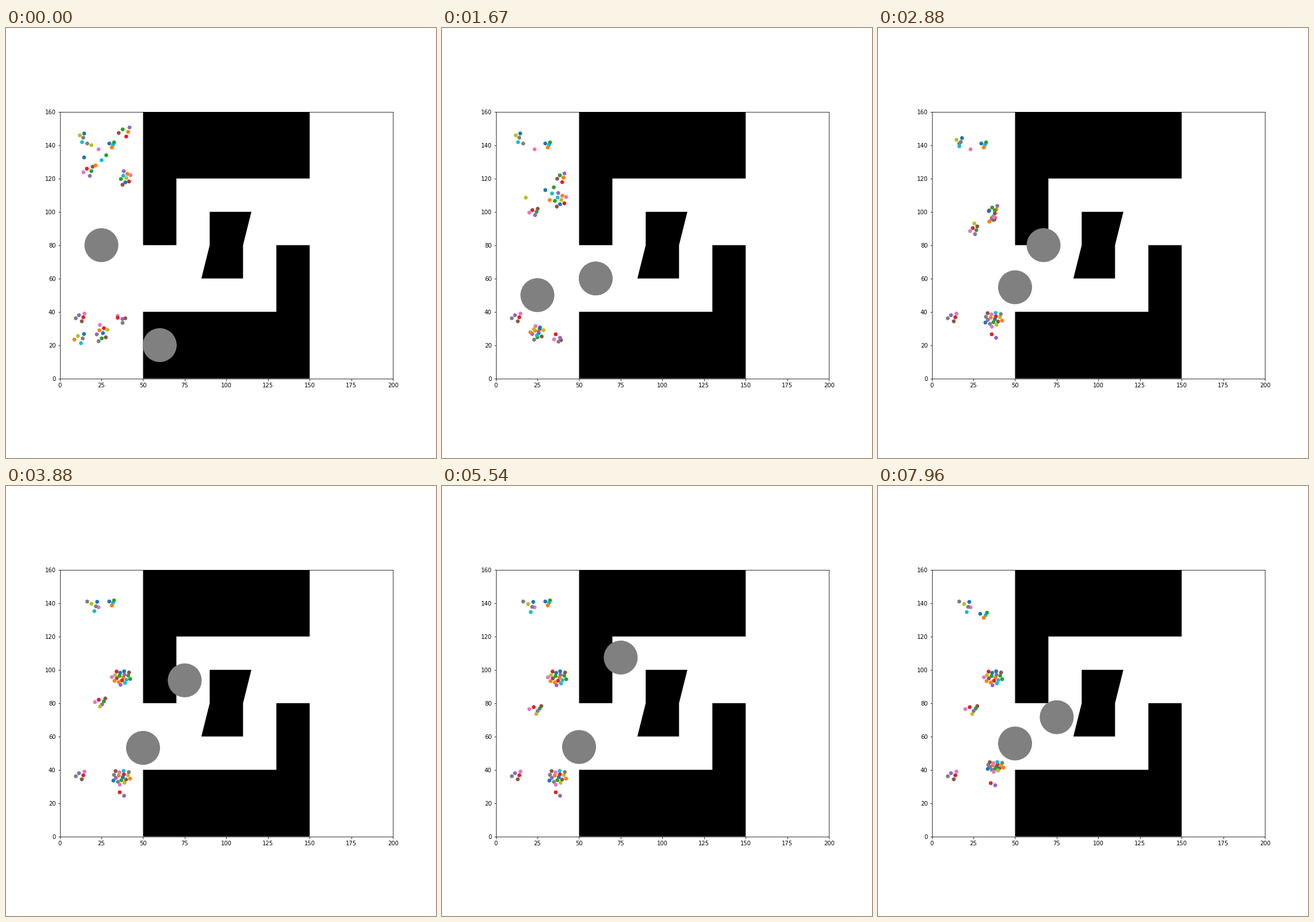
A matplotlib script for the animation above (8000 ms loop, 748 px wide and 748 px high).

```python
import numpy as np
import matplotlib.pyplot as plt
from matplotlib.animation import FuncAnimation
from matplotlib.patches import Circle, Polygon

SIZE, DPI = 748, 72
FRAMES, LOOP = 192, 8000
LEG = 20  # frames per leg of the plan
END = 9.55  # legs reached in the last frame
GOLDEN = np.pi * (3 - 5 ** 0.5)

fig, ax = plt.subplots(figsize=(SIZE / DPI, SIZE / DPI), dpi=DPI)
ax.set_aspect("equal")
ax.set_xlim(0, 200)
ax.set_ylim(0, 160)

WALLS = [
    [(50, 160), (150, 160), (150, 120), (70, 120), (70, 80), (50, 80)],
    [(90, 100), (115, 100), (110, 80), (110, 60), (85, 60), (90, 80)],
    [(50, 0), (50, 40), (130, 40), (130, 80), (150, 80), (150, 0)],
]
for wall in WALLS:
    ax.add_patch(Polygon(wall, facecolor="black", lw=0, snap=False))

# Large discs: one stop per leg
ROUTES = [
    [(25, 80), (25, 65), (25, 50)] + [(50, 50), (50, 60)] * 4,
    [(60, 20), (60, 40), (60, 60), (60, 80)]
    + [(75, y) for y in (80, 100, 120, 100, 80, 60, 80)],
]
discs = [ax.add_patch(Circle(r[0], 10, color="gray", zorder=3))
         for r in ROUTES]


def cloud(n, x, y, rx=0, ry=0):
    """Spread n points evenly over an ellipse."""
    k = np.arange(n)
    r, a = np.sqrt((k + 0.5) / n), k * GOLDEN
    return np.c_[x + rx * r * np.cos(a), y + ry * r * np.sin(a)]


class Swarm:
    """Dots that drift between arrangements, each a set of clouds."""

    def __init__(self, starts, stages):
        """starts: first colour of each opening cloud; stages: leg -> clouds."""
        self.legs = list(stages)
        self.shapes = [np.vstack([cloud(*c) for c in s])
                       for s in stages.values()]
        opening = stages[self.legs[0]]
        self.colors = [f"C{(first + i) % 10}"
                       for first, c in zip(starts, opening)
                       for i in range(c[0])]

    def at(self, leg):
        i = np.searchsorted(self.legs, leg, side="right") - 1
        if i + 1 == len(self.legs):
            return self.shapes[i]
        t = (leg - self.legs[i]) / (self.legs[i + 1] - self.legs[i])
        return self.shapes[i] * (1 - t) + self.shapes[i + 1] * t


corner = [(4, 13.2, 144.5, 2.6, 3.4)]
row = [(4, 31, 140.2, 2.8, 2)]
left = [(5, 25.8, 89, 3, 3.4)]
pair = [(1, 36, 26.5), (1, 38.6, 24.4)]
pack = [(17, 36.8, 35.6, 6.2, 4.8)]
right = (3, 37.3, 23, 4.5, 1)

swarms = [
    # resting dots
    Swarm([3], {0: [(5, 13, 36.7, 3.6, 3.4)]}),
    Swarm([6, 7], {0: [(1, 23.3, 137.5), (1, 16.5, 141)]}),
    # top left corner and its neighbours
    Swarm([7], {0: corner, 3: corner,
                4: [(4, 20.1, 138.7, 4, 3)],
                5: [(4, 20.8, 137.8, 3, 4)]}),
    Swarm([9], {0: row, 9: row, END: [(4, 30.9, 132.8, 4, 2)]}),
    # left group and its straggler
    Swarm([2], {0: [(5, 17.8, 124.4, 3.8, 4)],
                2: [(5, 23.4, 100, 3.5, 2.8)],
                3: left, 4: left,
                5: [(5, 24.8, 76.8, 5, 2.2)]}),
    Swarm([8], {0: [(1, 19, 140)], 2: [(1, 18, 108.5)], 3: [(1, 27, 98.5)],
                4: [(1, 23.8, 86.3)], 5: [(1, 24.3, 73.5)]}),
    # upper swarm: three groups gather into one
    Swarm([1, 9, 8], {
        0: [(5, 39.6, 148, 4.5, 4), (4, 20.5, 131, 13, 4),
            (9, 39.2, 120.3, 3.6, 5)],
        2: [(5, 39.7, 120.5, 3, 3.8), (4, 32, 111, 5, 5),
            (9, 38.4, 107.2, 4.2, 5)],
        3: [(5, 38, 106, 3.5, 4), (4, 33.7, 99.7, 2.5, 6),
            (9, 36.9, 96.1, 6, 4)],
        4: [(18, 37.2, 95.7, 6, 4.5)],
        5: [(18, 37.2, 95.3, 6, 5)]}),
    # lower swarm: likewise
    Swarm([0, 7, 5], {
        0: [(9, 25, 27.2, 4, 6), (5, 12.5, 24, 4, 4),
            (3, 37.3, 36.1, 5, 3)],
        1: [(9, 25, 27.2, 4, 5.5), (5, 18.5, 26, 4, 4), right],
        2: [(9, 24.8, 27.3, 4.2, 5), (5, 24.5, 28.3, 4, 3.5), right],
        3: pack, 9: pack,
        END: [(17, 37.9, 42, 5.8, 3.4)]}),
    Swarm([3, 4], {0: [(1, 34.8, 36.4), (1, 37.6, 35.7)],
                   1: pair, 9: pair,
                   END: [(1, 35.4, 32), (1, 38.1, 30.7)]}),
]


def positions(leg):
    return np.vstack([s.at(leg) for s in swarms])


dots = ax.scatter(*positions(0).T, s=46, linewidths=0, zorder=2,
                  c=[c for s in swarms for c in s.colors])


def update(frame):
    leg, j = divmod(frame, LEG)
    t = j / (LEG - 1)
    for disc, route in zip(discs, ROUTES):
        (x0, y0), (x1, y1) = route[leg], route[leg + 1]
        disc.center = x0 + (x1 - x0) * t, y0 + (y1 - y0) * t
    dots.set_offsets(positions(frame / LEG))
    return [*discs, dots]


anim = FuncAnimation(fig, update, frames=FRAMES, interval=LOOP / FRAMES,
                     init_func=lambda: update(0), repeat=True,
                     repeat_delay=0, blit=False)
plt.show()
```
